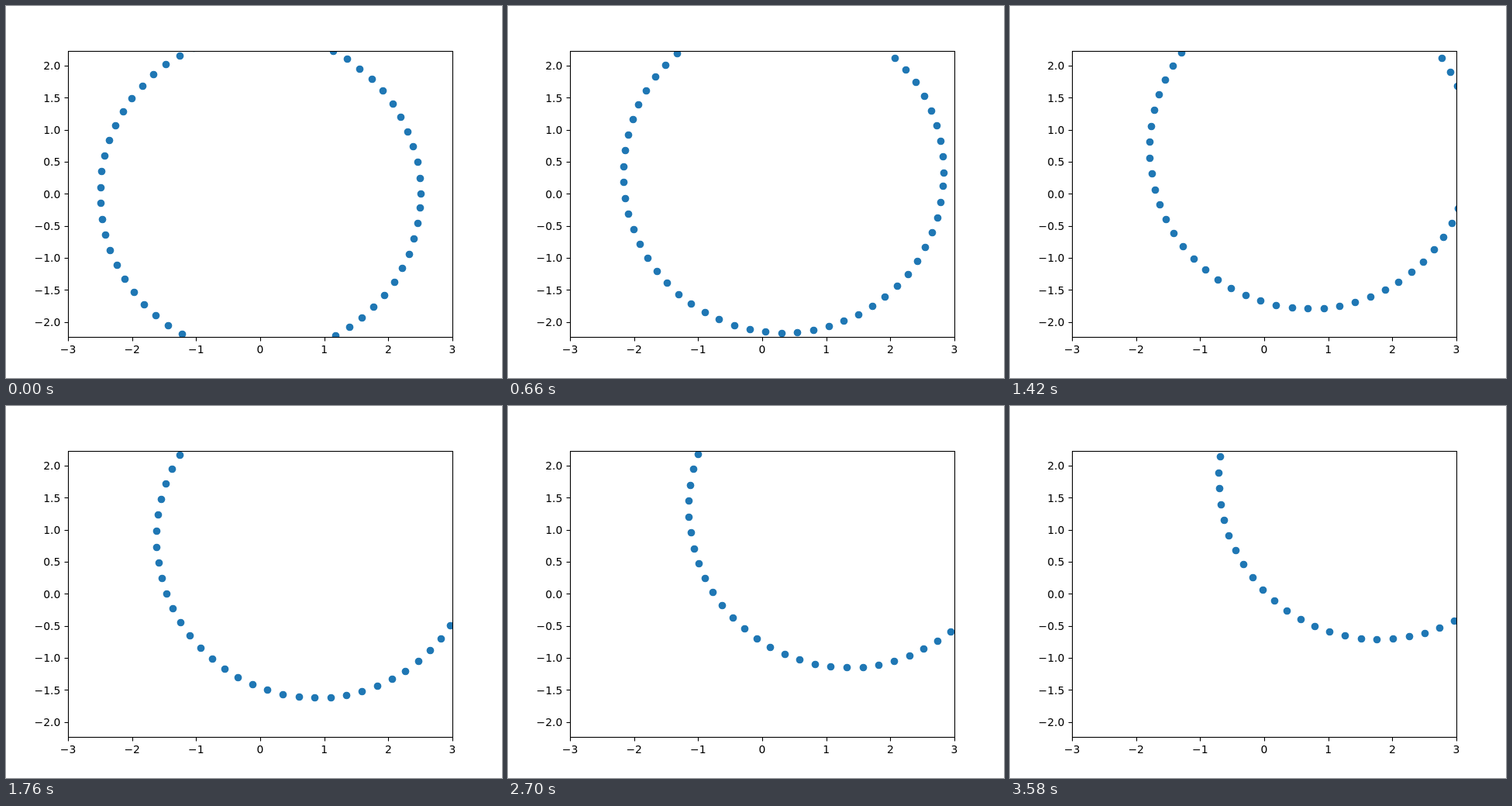
Recreate the animation shown at these times as an HTML page with a canvas. Size 640 px wide and 480 px high, loop 3600 ms.

```html
<!DOCTYPE html>
<html lang="en">
<head>
<meta charset="utf-8">
<title>Drifting circle</title>
<style>
  html, body { margin: 0; width: 100%; height: 100%; overflow: hidden; background: #fff; }
  canvas { display: block; }
</style>
</head>
<body>
<canvas id="stage" width="640" height="480"></canvas>
<script>
const ctx = document.getElementById('stage').getContext('2d');

const STEP_MS = 20, STEPS = 180, DRIFT = 0.01;
const RADIUS = 2.5, ANGLE_STEP = 0.1;
const UNIT = 496 / 6;
const DOT_RADIUS = 4.861;
const LINE = 1.111;

const toX = v => 328 + v * UNIT;
const toY = v => 242.4 - v * UNIT;
const snap = p => Math.floor(p + 0.5) + 0.5;
const label = (v, digits) => v.toFixed(digits).replace('-', '\u2212');

function line(x1, y1, x2, y2) {
  ctx.beginPath();
  ctx.moveTo(x1, y1);
  ctx.lineTo(x2, y2);
  ctx.stroke();
}

function drawDots(shift) {
  ctx.save();
  ctx.beginPath();
  ctx.rect(80, 58, 497, 370);
  ctx.clip();
  ctx.fillStyle = '#1f77b4';
  for (let i = 0; i * ANGLE_STEP < 2 * Math.PI; i++) {
    const angle = i * ANGLE_STEP;
    const x = snap(toX(RADIUS * Math.cos(angle) + shift));
    const y = snap(toY(RADIUS * Math.sin(angle) + shift));
    ctx.beginPath();
    ctx.arc(x, y, DOT_RADIUS, 0, 2 * Math.PI);
    ctx.fill();
  }
  ctx.restore();
}

function drawAxes() {
  ctx.strokeStyle = ctx.fillStyle = '#000';
  ctx.lineWidth = LINE;
  ctx.font = '13.889px "DejaVu Sans", sans-serif';
  ctx.textBaseline = 'alphabetic';
  ctx.strokeRect(80.5, 58.5, 496, 369);

  ctx.textAlign = 'center';
  for (let v = -3; v <= 3; v++) {
    const x = snap(toX(v));
    line(x, 427.5, x, 432.5);
    ctx.fillText(label(v, 0), toX(v), 448);
  }

  ctx.textAlign = 'right';
  for (let v = -2; v <= 2; v += 0.5) {
    const y = snap(toY(v));
    line(75.5, y, 80.5, y);
    ctx.fillText(label(v, 1), 70.3, Math.round(toY(v) + 5.27));
  }
}

function render(ms) {
  const step = Math.floor(ms / STEP_MS) % STEPS;
  ctx.fillStyle = '#fff';
  ctx.fillRect(0, 0, 640, 480);
  drawDots(step * DRIFT);
  drawAxes();
}

const start = performance.now();
function tick() {
  render(performance.now() - start);
  requestAnimationFrame(tick);
}
tick();
</script>
</body>
</html>
```
